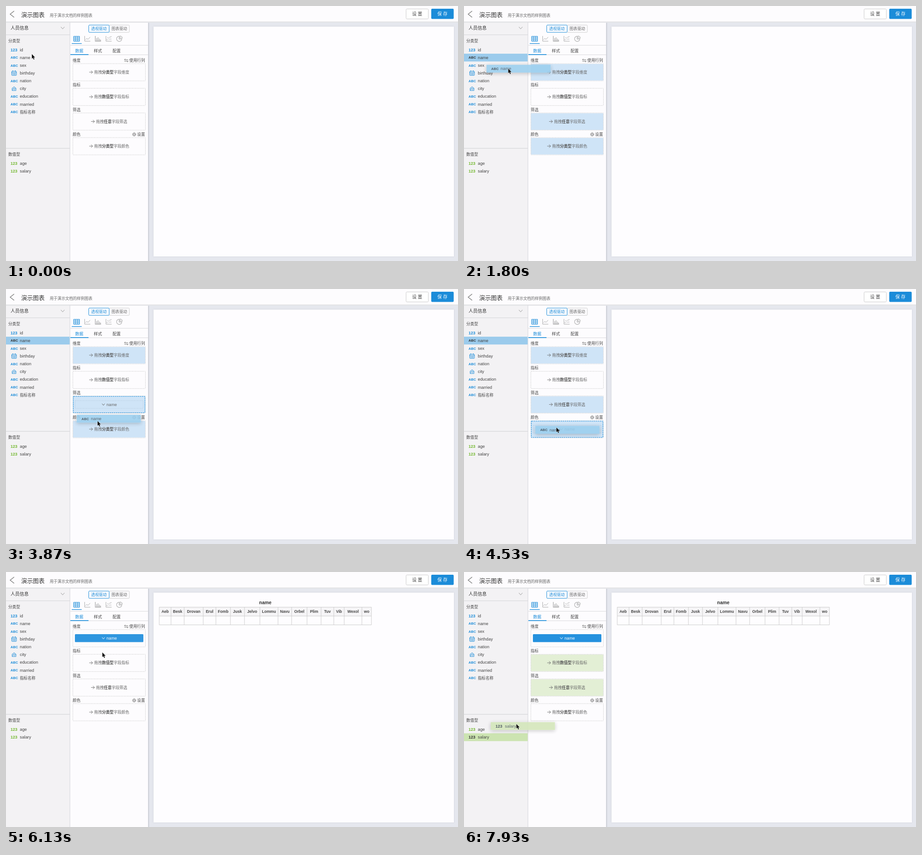
An HTML page for the animation above (8000 ms loop, 997 by 562 pixels).

```html
<!DOCTYPE html>
<html lang="zh">
<head>
<meta charset="utf-8">
<style>
html, body { margin: 0; width: 100%; height: 100%; overflow: hidden; background: #fdfcfe; }
svg { display: block; width: 997px; height: 562px; }
text { font-family: "Liberation Sans", "Noto Sans CJK SC", "Noto Sans CJK", sans-serif; white-space: pre; }
</style>
</head>
<body>
<svg id="stage" viewBox="0 0 997 562" xmlns="http://www.w3.org/2000/svg">
  <defs>
    <filter id="soft" x="-20%" y="-100%" width="140%" height="300%">
      <feDropShadow dx="0" dy="2" stdDeviation="4" flood-color="#000" flood-opacity=".24"/>
    </filter>
    <filter id="faint" x="-5%" y="-5%" width="110%" height="110%">
      <feDropShadow dx="0" dy="0" stdDeviation="1.5" flood-color="#556" flood-opacity=".16"/>
    </filter>
  </defs>
</svg>
<script>
const stage = document.getElementById('stage');
const BLUE = '#1b8cd9', GREEN = '#72b82e', INK = '#444', GREY = '#aaa';

function el(tag, attrs, parent = stage) {
  const n = document.createElementNS('http://www.w3.org/2000/svg', tag);
  for (const k in attrs) n.setAttribute(k, attrs[k]);
  parent.appendChild(n);
  return n;
}
const group = (parent, attrs = {}) => el('g', attrs, parent);
const rect = (x, y, width, height, fill, more = {}, parent) =>
  el('rect', { x, y, width, height, fill, ...more }, parent);
const line = (d, stroke, w = 1, parent, more = {}) =>
  el('path', { d, stroke, 'stroke-width': w, fill: 'none', ...more }, parent);
function text(str, x, y, size, fill = INK, weight = 400, parent, anchor = 'start') {
  const n = el('text', { x, y, 'font-size': size, fill, 'font-weight': weight, 'text-anchor': anchor }, parent);
  n.textContent = str;
  return n;
}
const show = (n, on) => n.setAttribute('visibility', on ? 'inherit' : 'hidden');
const fade = (n, v) => n.setAttribute('opacity', v);

// ---- page frame ----
rect(0, 0, 997, 562, '#fdfcfe');
rect(0, 36, 141, 526, '#f3f2f4');
rect(314, 36, 683, 526, '#e5e7ee');
rect(313.5, 36, 2, 526, '#c9ccd3');
rect(325.5, 45.5, 662.5, 506.5, '#fefdff', { filter: 'url(#faint)' });
rect(0, 34.5, 997, 1.2, '#d3d4d8');
rect(0, 35.7, 997, 1.2, '#e6e7ea');
rect(140.5, 36, 1, 526, '#d4d4d8');
rect(0, 63, 141, 1, '#d4d4d8');
rect(0, 313, 141, 1.2, '#d4d4d8');
rect(142, 86, 172, 1, '#d9d9dc');
rect(142, 107, 172, 1, '#d9d9dc');

// ---- header ----
line('M18 11L9.2 18L18 25', '#777', 1.3);
text('演示图表', 33.5, 23.5, 12.9, '#333');
text('用于演示文档的样例图表', 96.5, 24.3, 8.55, '#666');
rect(882.5, 6.5, 49, 22, '#fff', { rx: 2, stroke: '#ccc' });
text('设 置', 907, 20.8, 9.8, INK, 400, stage, 'middle');
rect(938, 6, 49.5, 22.5, BLUE, { rx: 2 });
text('保 存', 962.7, 20.8, 9.8, '#fff', 400, stage, 'middle');

// ---- field list ----
text('人员信息', 10, 51.5, 10, '#333');
line('M121 46L125 50.5L129 46', '#999');
text('分类型', 5, 80, 8.7);
text('数值型', 5, 330.3, 8.7);

function kind(type, x, y, fill, parent) {
  return type === 'ABC' ? text('ABC', x, y + 2.8, 7.6, fill, 700, parent)
    : text('123', x, y + 3.2, 9, fill, 700, parent);
}
function field(type, name, y, colour, parent) {
  if (type === 'date') {
    rect(12.5, y - 4, 10.5, 9, 'none', { stroke: BLUE, rx: 1 }, parent);
    line(`M12.5 ${y - 1}h10.5M15 ${y - 6}v3M20.5 ${y - 6}v3`, BLUE, 1, parent);
    line(`M14.5 ${y + 1}h6.5M14.5 ${y + 3}h6.5`, BLUE, 1.1, parent, { 'stroke-dasharray': '1.5 1' });
  } else if (type === 'place') {
    line(`M15.5 ${y - 1.2}h-2v5.5h8.500v-5.500h-2M13.500 ${y + 3}l3-2 2 1.500 3-2`, BLUE, .9, parent);
    el('circle', { cx: 17.8, cy: y - 2, r: 2, fill: '#f3f2f4', stroke: BLUE, 'stroke-width': .9 }, parent);
  } else kind(type, 10, y, colour, parent);
  text(name, 30.5, y + 3.2, /[a-z]/.test(name) ? 9.3 : 8.6, INK, 400, parent);
}

// Selected row: tinted strip with dark label over the plain one
function pickedRow(type, name, y, tint) {
  const g = group(stage);
  rect(0, y - 8.5, 140.5, 17.2, tint, {}, g);
  field(type, name, y, '#333', g);
  return g;
}
const fields = [['123', 'id'], ['ABC', 'name'], ['ABC', 'sex'], ['date', 'birthday'], ['ABC', 'nation'],
  ['place', 'city'], ['ABC', 'education'], ['ABC', 'married'], ['ABC', '指标名称']];
fields.forEach(([k, n], i) => field(k, n, 96.5 + 17.12 * i, BLUE));
field('123', 'age', 346.8, GREEN);
field('123', 'salary', 364, GREEN);
const nameRow = pickedRow('ABC', 'name', 113.6, '#9bcbec');
const salaryRow = pickedRow('123', 'salary', 364, '#cce4b1');

// ---- middle panel ----
rect(227.5, 42, 44.5, 16, '#fdfcfe', { stroke: '#ccc', rx: 1.5 });
rect(182.5, 42, 45, 16, '#fdfcfe', { stroke: BLUE, rx: 1.5 });
text('透视驱动', 187.8, 53.2, 8.6, BLUE);
text('图表驱动', 232.7, 53.2, 8.6, '#666');

rect(149.5, 67, 12.5, 10.5, 'none', { stroke: BLUE, 'stroke-width': 1.2 });
line('M149.500 70.500h12.500M149.500 74h12.500M153.700 67v10.500M157.900 67v10.500', BLUE);
rect(145, 82, 22, 1.3, BLUE);
line('M173.500 66v11.500H186M175 74.500l3-3 3 2 4.500-5', GREY);
line('M197 66v11.500H209.500M200 77v-6M203 77v-8M206 77v-5M208.500 77v-3', GREY, 1.3);
line('M220.500 66v11.500H233', GREY);
[[223, 74], [225, 70], [227.5, 73], [229, 69], [231.5, 67.5], [231, 73]].forEach(([cx, cy]) =>
  el('circle', { cx, cy, r: .9, fill: GREY }));
line('M249.500 66.500A5.800 5.800 0 1 0 255.500 73H249.500zM251.500 66A5.500 5.500 0 0 1 256.500 71H251.500z', GREY, 1.1);

text('数据', 152.5, 101.5, 9, BLUE, 500);
text('样式', 193.8, 101.5, 9);
text('配置', 235, 101.5, 9);
rect(142, 106.3, 40, 1.7, BLUE);

text('使用行列', 272, 123.2, 8.65);
line('M269.500 118.500H261L263.500 116M261 121.500H269.500L267 124', '#666', .9);
text('设置', 289.3, 286.3, 8.65);
el('circle', { cx: 282.7, cy: 283, r: 3.6, fill: 'none', stroke: '#777', 'stroke-width': 1, 'stroke-dasharray': '2 .83' });
el('circle', { cx: 282.7, cy: 283, r: 3, fill: 'none', stroke: '#777', 'stroke-width': .7 });
el('circle', { cx: 282.7, cy: 283, r: 1.3, fill: 'none', stroke: '#777', 'stroke-width': .8 });

const chevron = (y, colour, parent) => line(`M211.800 ${y - 1.8}L214.800 ${y + 1.8}L217.800 ${y - 1.8}`, colour, 1, parent);

const zones = [['维度', '分类型'], ['指标', '数值型'], ['筛选', '任意'], ['颜色', '分类型']].map(([label, type], i) => {
  const top = 127 + 54.35 * i, mid = top + 18.8;
  text(label, 147, top - 4, 8.65, INK, 500);
  rect(147.5, top, 160, 38, 'none', { stroke: '#ccc', 'stroke-dasharray': '2 1.5', rx: 1 });
  const blue = rect(148, top + .7, 159, 36.6, '#cfe4f7');
  const green = rect(148, top + .7, 159, 36.6, '#e3efd5');

  const hint = group(stage), x = type.length > 2 ? 194.6 : 198.7;
  line(`M${x - 11} ${mid}h7.500m-3.500 -3.500l3.500 3.500l-3.500 3.500`, '#666', .9, hint);
  const t = text('拖拽', x, mid + 3.2, 8.57, '#666', 400, hint);
  el('tspan', { 'font-weight': 700, fill: '#555' }, t).textContent = type;
  el('tspan', {}, t).textContent = '字段' + label;

  const over = group(stage);
  rect(148.5, top + 1, 158, 36, 'none', { stroke: '#2a97e2', 'stroke-width': 1.3, 'stroke-dasharray': '2.6 1.7', rx: 1 }, over);
  rect(152.5, top + 10.3, 150, 17, 'none', { stroke: '#b4c9dc', 'stroke-dasharray': '2 1.5', 'stroke-width': .8 }, over);
  chevron(mid, '#666', over);
  text('name', 221.8, mid + 3.2, 9.1, '#666', 400, over);
  return { blue, green, hint, over };
});

const chip = group(stage);
rect(152, 137, 151, 17.5, '#2591de', { rx: 1.5 }, chip);
chevron(145.8, '#fff', chip);
text('name', 221.8, 149, 9.1, '#fff', 400, chip);

// ---- pivot table ----
const table = group(stage);
const people = ['Aeb', 'Besk', 'Drovan', 'Erul', 'Fomb', 'Jusk', 'Jelvo', 'Lommu', 'Navu', 'Orbel', 'Plim', 'Tuv', 'Vib', 'Wexol', 'wo'];
const edges = [338, 364, 393, 435, 463, 495, 526, 560, 600, 630, 664, 695, 723, 746, 785, 806];
text('name', 572, 70.8, 10.5, '#333', 700, table, 'middle');
rect(338, 77.5, 468, 19.5, '#f6f5f7', {}, table);
line('M338 77.500H806M338 97H806M338 116.500H806' + edges.map(x => `M${x} 77.5V116.5`).join(''), '#ccc', 1, table);
people.forEach((p, i) => text(p, (edges[i] + edges[i + 1]) / 2, 90.2, 8.6, '#444', 700, table, 'middle'));

// ---- dragged item and pointer ----
function dragged(type, name, tint) {
  const g = group(stage), body = group(g, { opacity: .88 });
  rect(0, 0, 141.5, 17.2, tint, { filter: 'url(#soft)' }, body);
  kind(type, 10.5, 8.6, '#3a4650', body);
  text(name, 31.3, 11.8, 9.3, '#4a5560', 400, body);
  return g;
}
const nameItem = dragged('ABC', 'name', '#9bcfef');
const salaryItem = dragged('123', 'salary', '#d3e6b9');
const pointer = el('path', {
  d: 'M0 0V10.200L2.300 8.100L4 12L5.700 11.300L4 7.500H7.200Z',
  fill: '#111', stroke: '#fff', 'stroke-width': .8, 'paint-order': 'stroke'
});

// ---- motion ----
const LOOP = 8000, LAG = 33;
// time, x, y of the pointer
const path = [
  [0, 57, 106], [600, 57, 106], [930, 47, 113], [1500, 47, 113], [1767, 96, 137.5], [1800, 97.5, 138],
  [2330, 199, 147], [2530, 203, 147], [2640, 203, 147], [3037, 211, 219], [3070, 211.5, 222],
  [3470, 206, 255], [3530, 206, 255], [3837, 202.5, 285], [3870, 202, 291], [4330, 204, 316], [4400, 204, 316],
  [4967, 202.5, 201], [5000, 203, 194], [5200, 205, 152], [5600, 204, 146], [6000, 204, 146],
  [6130, 212.5, 177], [6400, 60, 354], [6670, 60, 354], [6850, 55, 362], [7080, 55, 362],
  [7200, 70, 367], [7330, 75, 363], [7500, 75, 363], [7897, 114, 338], [7930, 115.5, 335], [8000, 119, 329]
];
const slope = (i, c) => (path[i + 1][c] - path[i][c]) / (path[i + 1][0] - path[i][0]);
function tangent(i, c) {
  if (i === 0 || i === path.length - 1) return 0;
  const a = slope(i - 1, c), b = slope(i, c);
  return a * b <= 0 ? 0 : 2 * a * b / (a + b);
}
function at(t) {
  let i = 0;
  while (i < path.length - 2 && path[i + 1][0] <= t) i++;
  const h = path[i + 1][0] - path[i][0], u = (t - path[i][0]) / h, v = 1 - u;
  return [1, 2].map(c =>
    v * v * (1 + 2 * u) * path[i][c] + u * u * (3 - 2 * u) * path[i + 1][c] +
    h * u * v * (v * tangent(i, c) - u * tangent(i + 1, c)));
}
const ramp = (t, from, len) => {
  const u = Math.min(1, Math.max(0, (t - from) / len));
  return u * u * (3 - 2 * u);
};
const within = (t, a, b) => t >= a && t < b;
const place = (n, x, y) => n.setAttribute('transform', `translate(${x.toFixed(2)} ${y.toFixed(2)})`);

const DRAG = 1530, DROP = 6000, DRAG2 = 7100;
const hovers = [[[2060, 2760], [5130, DROP]], [], [[3200, 3900]], [[3900, 4560]]];

function draw(t) {
  const [x, y] = at(t), [gx, gy] = at(Math.max(0, t - LAG));
  const dropped = t >= DROP;
  place(pointer, x, y);
  place(nameItem, gx - 46.5, gy - 8);
  place(salaryItem, gx - 55, gy - 7);
  show(nameItem, within(t, DRAG, DROP));
  show(salaryItem, t >= DRAG2);
  fade(nameRow, dropped ? 0 : ramp(t, 600, 330));
  fade(salaryRow, ramp(t, 6750, 300));
  zones.forEach((z, i) => {
    const hover = hovers[i].some(([a, b]) => within(t, a, b));
    fade(z.blue, i === 1 || dropped ? 0 : ramp(t, DRAG, 150));
    fade(z.green, i === 1 || i === 2 ? ramp(t, DRAG2, 150) : 0);
    show(z.over, hover);
    show(z.hint, !hover && !(i === 0 && dropped));
  });
  show(chip, dropped);
  fade(chip, .95 + .05 * ramp(t, 6130, 200));
  show(table, t >= DROP + 60);
}

function tick() {
  draw(performance.now() % LOOP);
  requestAnimationFrame(tick);
}
tick();
</script>
</body>
</html>
```
